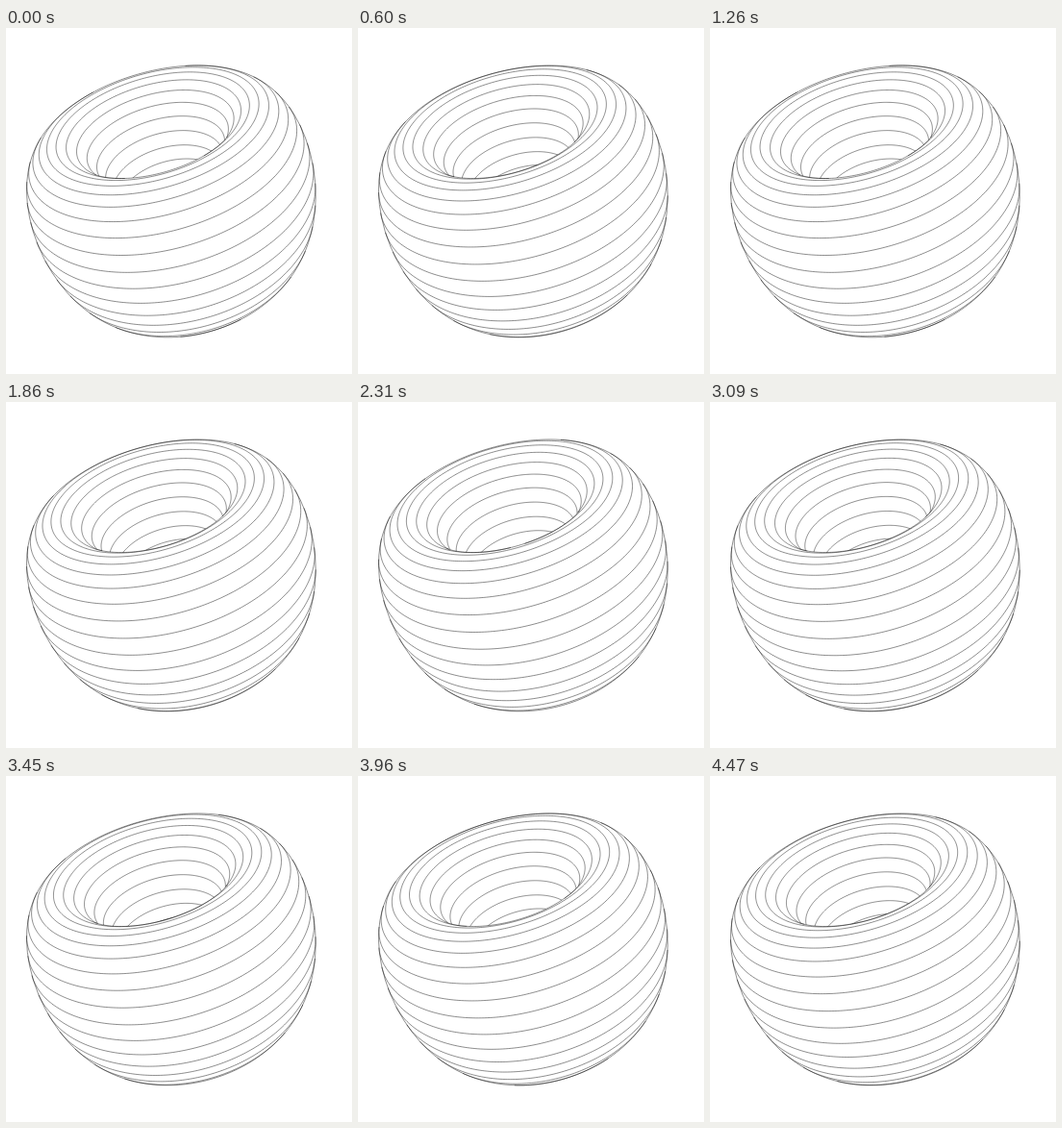
Recreate the animation shown at these times as an HTML page with a canvas. Size 360 px wide and 360 px high, loop 4500 ms.

```html
<!DOCTYPE html>
<html lang="en">
<head>
<meta charset="utf-8">
<title>Ringed torus</title>
<style>
  html, body { margin: 0; width: 100%; height: 100%; overflow: hidden; background: #fff; }
  canvas { display: block; }
</style>
</head>
<body>
<canvas id="stage" width="360" height="360"></canvas>
<script>
const ctx = document.getElementById('stage').getContext('2d');
const { PI, sin, cos, hypot, atan2, acos, floor } = Math;
const rad = deg => deg * PI / 180;

const LOOP = 4500, STEP = 30, RING_TIME = 1260;
const RINGS = 32, GAP = 2 * PI / RINGS, START = rad(8.9);

// Torus with an upright elliptical tube, seen in perspective
const R = 100.5, TUBE = 44.5, TALL = 91, DIST = 600;
const CX = 172.7, CY = 172;
const s = 0.59, c = 0.807;
const rs = sin(rad(16)), rc = cos(rad(16));
const LIP = rad(56);

// phi runs round the tube, a round the axis (0 is nearest)
function project(phi, a) {
  const rho = R + TUBE * cos(phi), z = TALL * sin(phi);
  const depth = c * rho * cos(a) + s * z;
  const k = DIST / (DIST - depth);
  const x = k * rho * sin(a);
  const y = k * (s * rho * cos(a) - c * z);
  return [CX + x * rc + y * rs, CY - x * rs + y * rc];
}

// The surface faces the eye where p cos(phi) + q sin(phi) > 1
const q = DIST * s / TALL;
const pAt = a => (DIST * c * cos(a) - R) / TUBE;
const faces = (phi, a) => pAt(a) * cos(phi) + q * sin(phi) > 1;

// Tube angle where the surface turns away: side 1 at the lip, -1 outside
const edge = (a, side) => atan2(q, pAt(a)) + side * acos(1 / hypot(pAt(a), q));

const inBowl = (phi, a) => cos(phi) < 0 && cos(a) < cos(LIP);

function drawRings(shift, bowl) {
  const da = rad(1);
  ctx.beginPath();
  for (let i = 0; i < RINGS; i++) {
    const phi = shift + i * GAP;
    let down = false;
    for (let j = 0; j < 360; j++) {
      const a = j * da, mid = a + da / 2;
      const shown = faces(phi, mid) && inBowl(phi, mid) === bowl;
      if (shown) {
        if (!down) ctx.moveTo(...project(phi, a));
        ctx.lineTo(...project(phi, a + da));
      }
      down = shown;
    }
  }
  ctx.stroke();
}

function trace(phiAt, from, to) {
  const n = 120;
  for (let i = 0; i <= n; i++) {
    const a = from + (to - from) * i / n;
    ctx.lineTo(...project(phiAt(a), a));
  }
}

const lip = a => edge(a, 1);
const rim = a => edge(a, -1);

// White front wall that hides the depth of the bowl
function drawWall() {
  ctx.beginPath();
  trace(lip, -LIP, LIP);
  trace(() => 0, LIP, -LIP);
  ctx.fill();
}

function drawEdges() {
  ctx.beginPath();
  trace(rim, -PI, PI);
  ctx.stroke();
  ctx.beginPath();
  trace(lip, -LIP, LIP);
  ctx.stroke();
}

function draw(t) {
  const shift = START + GAP * t / RING_TIME;
  ctx.fillStyle = '#fff';
  ctx.fillRect(0, 0, 360, 360);
  ctx.strokeStyle = '#000';
  ctx.lineWidth = 0.45;
  drawRings(shift, true);
  drawWall();
  drawRings(shift, false);
  drawEdges();
}

const begin = performance.now();
function tick() {
  const t = (performance.now() - begin) % LOOP;
  draw(floor(t / STEP) * STEP);
  requestAnimationFrame(tick);
}
tick();
</script>
</body>
</html>
```
